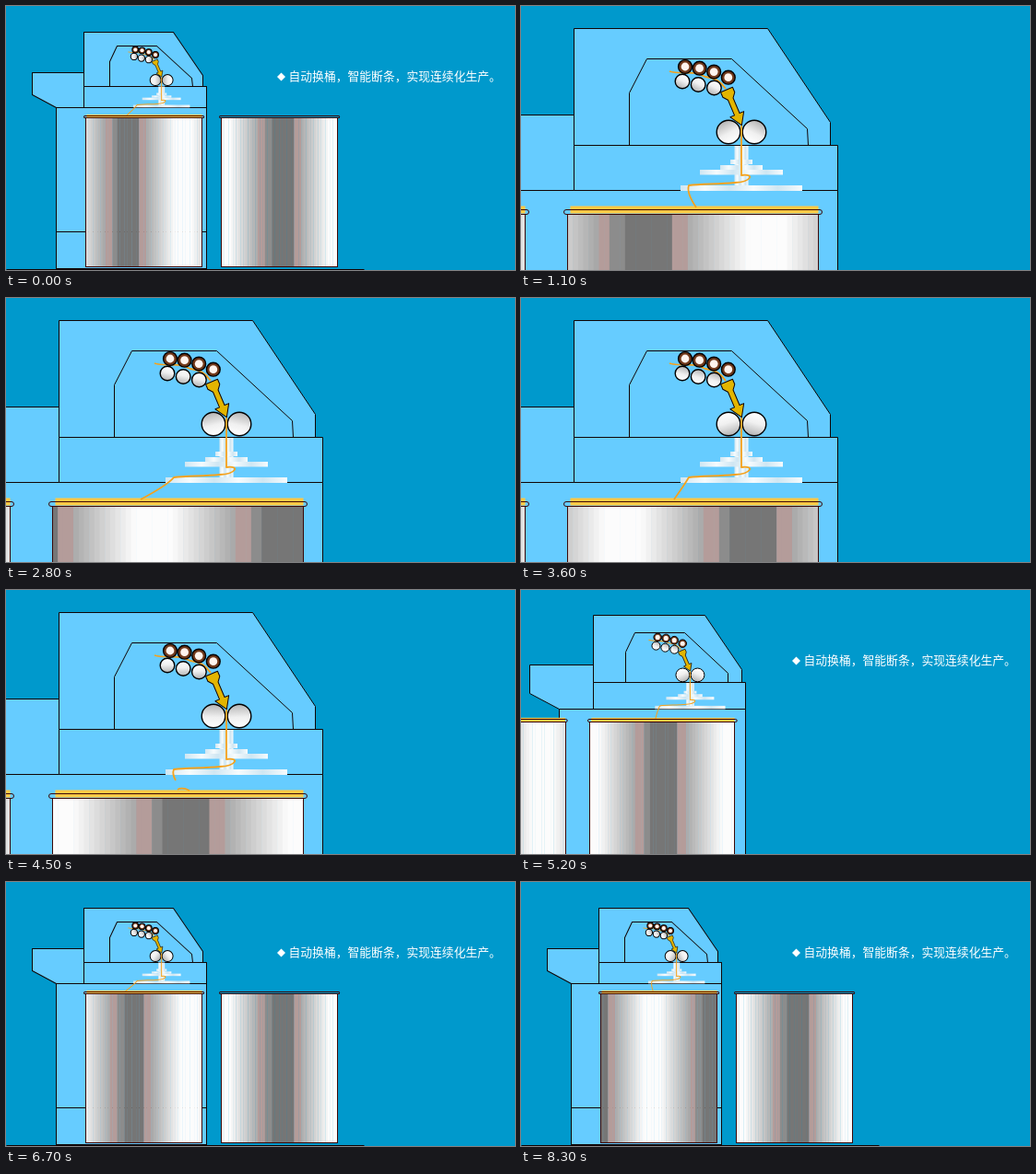
An HTML page with a canvas that plays this animation: 552 by 287 pixels, repeating every 8.4 s.

```html
<!DOCTYPE html>
<html lang="zh-CN">
<head>
<meta charset="utf-8">
<title>自动换桶</title>
<style>
html, body { margin: 0; width: 100%; height: 100%; overflow: hidden; background: #0099cc; }
canvas { display: block; }
</style>
</head>
<body>
<canvas id="stage" width="552" height="287"></canvas>
<script>
const ctx = document.getElementById('stage').getContext('2d');
const LOOP = 8400, STEP = 100, ZOOM = 2.15;
const SHIFT = { x: 123.6, y: 36.2 };
const CAN = { w: 272, top: 226, bottom: 574, strips: 48 };
const INK = '#100404', MAROON = '#3a0808', ORANGE = '#f5a21c', BLUE = '#66ccff';

// Scene units are the close-up's pixels; view maps them to the screen.
const view = { q: 1, x: 0, y: 0 };
let hair = 1;

const clamp = v => Math.max(0, Math.min(1, v));
const snapTo = (v, q, o) => (Math.floor(v * q + o) + .5 - o) / q;
const snapX = x => snapTo(x, view.q, view.x);
const snapY = y => snapTo(y, view.q, view.y);

function zoomAt(t) {
  return t < 4500 ? clamp(t / 900) : 1 - clamp((t - 4500) / 886);
}

// The can spins, rests while it is exchanged, then spins again.
function phaseAt(t) {
  const first = Math.min(Math.max(t - 200, 0), 4400);
  const second = Math.max(t - 6350, 0);
  return .32 - first * .00023 - second * .00028;
}

function shape(points, fill, close = true) {
  ctx.beginPath();
  points.forEach(([x, y]) => ctx.lineTo(snapX(x), snapY(y)));
  if (close) ctx.closePath();
  if (fill) { ctx.fillStyle = fill; ctx.fill(); }
  ctx.strokeStyle = INK;
  ctx.lineWidth = hair;
  ctx.stroke();
}

function box(x0, y0, x1, y1) {
  shape([[x0, y0], [x1, y0], [x1, y1], [x0, y1]], BLUE);
}

function disc(x, y, r, fill) {
  ctx.beginPath();
  ctx.arc(x, y, r, 0, Math.PI * 2);
  ctx.fillStyle = fill;
  ctx.fill();
}

function rimmed(x, y, r, fill) {
  disc(x, y, r, fill);
  ctx.strokeStyle = '#000';
  ctx.lineWidth = Math.max(1.4, hair);
  ctx.stroke();
}

function roller(x, y, r, turn) {
  const dx = Math.cos(turn) * r, dy = Math.sin(turn) * r;
  const g = ctx.createLinearGradient(x - dx, y - dy, x + dx, y + dy);
  g.addColorStop(0, '#ffffff');
  g.addColorStop(.45, '#f0f0f0');
  g.addColorStop(1, '#b4b4b4');
  rimmed(x, y, r, g);
}

function machine() {
  box(-7, 200.5, 343.5, 577);
  shape([[-7, 491], [343.5, 491]], null, false);
  shape([[-63, 118.7], [57.5, 118.7], [57.5, 200.5], [-7, 200.5], [-63, 172]], BLUE);
  shape([[57.5, 24.5], [267, 24.5], [335.5, 126], [335.5, 151.5], [57.5, 151.5]], BLUE);
  box(57.5, 151.5, 343.5, 200.5);
  shape([[117.5, 151], [117.5, 94], [136, 57.5], [228.5, 57.5], [310, 133], [311, 151]], null, false);
  shape([[-SHIFT.x, 579], [712, 579]], null, false);
}

function plate(half, y, h) {
  const g = ctx.createLinearGradient(239 - half, 0, 239 + half, 0);
  for (let i = 0; i < 6; i++) g.addColorStop(i / 5, i % 2 ? '#f6fbfd' : '#cfe6f2');
  ctx.fillStyle = g;
  ctx.fillRect(239 - half, y, half * 2, h);
}

function coiler() {
  plate(7.5, 152, 44);
  plate(12, 167, 5);
  plate(23, 173, 5);
  plate(45, 178, 5.5);
  plate(66, 195, 6);
}

function funnel() {
  const side = [[7, 0], [7, 6], [3, 11], [3, 29], [8, 29]];
  const mirror = side.map(([x, y]) => [-x, y]).reverse();
  ctx.save();
  ctx.translate(223, 91);
  ctx.rotate(-.4);
  ctx.beginPath();
  [...side, [0, 42], ...mirror].forEach(([x, y]) => ctx.lineTo(x, y));
  ctx.closePath();
  ctx.fillStyle = '#e3b500';
  ctx.fill();
  ctx.strokeStyle = INK;
  ctx.lineWidth = Math.min(hair, 1.2);
  ctx.stroke();
  ctx.restore();
}

function rollers(t) {
  const turn = t / 260;
  ctx.strokeStyle = ORANGE;
  ctx.lineWidth = Math.max(1.8, hair);
  ctx.beginPath();
  ctx.moveTo(161, 71);
  ctx.bezierCurveTo(176, 75, 184, 69, 200, 77);
  ctx.quadraticCurveTo(214, 78, 222, 90);
  ctx.stroke();
  for (let i = 0; i < 3; i++) roller(175 + 17.2 * i, 82 + 3.5 * i, 7.8, -turn);
  for (let i = 0; i < 4; i++) {
    const x = 178 + 15.6 * i, y = 66 + .6 * i + 1.1 * i * i;
    rimmed(x, y, 7.4, '#71391b');
    disc(x, y, 4.4, '#fff4ee');
  }
  funnel();
  roller(225, 137, 12.8, turn);
  roller(253, 137, 12.8, Math.PI - turn);
}

// Metal colour at signed distance d (in turns) from the darkest line.
function sheen(d) {
  const far = Math.abs(d);
  if (far > .12 && far < .178) return '#b49c9a';
  let grey = d < -.065 ? 140 : 118;
  if (far >= .178) grey = 168 + 84 * clamp((far - .178) / .25);
  return `rgb(${grey}, ${grey}, ${grey})`;
}

function can(x, phase, filled) {
  const { w, top, bottom, strips } = CAN;
  const left = snapX(x), right = snapX(x + w), roof = snapY(top);
  const step = (right - left) / strips;
  for (let i = 0; i < strips; i++) {
    const u = (i + .5) / strips - phase - .18;
    ctx.fillStyle = sheen(u - Math.round(u));
    const extra = i < strips - 1 ? .6 : 0;
    ctx.fillRect(left + i * step, roof, step + extra, bottom - roof);
  }
  ctx.strokeStyle = MAROON;
  ctx.lineWidth = hair;
  ctx.strokeRect(left, roof, right - left, snapY(bottom) - roof);
  if (filled) {
    ctx.fillStyle = '#ffc944';
    ctx.fillRect(x + 3, 217.5, w - 3, 8);
  }
  const lip = snapY(221);
  ctx.beginPath();
  ctx.roundRect(snapX(x - 4), lip, w + 8, roof - lip, 2.5);
  ctx.stroke();
}

function thread(t) {
  const tip = 168 + 22 * Math.cos((t - 1100) / 3400 * Math.PI * 2);
  const cut = t >= 4300 && t < 4700;
  ctx.strokeStyle = ORANGE;
  ctx.lineWidth = Math.max(1.8, hair);
  ctx.lineJoin = 'round';
  ctx.beginPath();
  ctx.moveTo(239, 130);
  ctx.lineTo(239, 184);
  ctx.bezierCurveTo(254, 182, 250, 191, 232, 192);
  ctx.bezierCurveTo(214, 194, 196, 193, 182, 195);
  if (cut) {
    ctx.quadraticCurveTo(180, 200, 184, 207);
    ctx.moveTo(186, 217);
    ctx.quadraticCurveTo(191, 214, 199, 218);
  } else {
    ctx.quadraticCurveTo(164 + tip * .08, 203, tip, 219);
  }
  ctx.stroke();
}

function caption() {
  ctx.fillStyle = '#fff';
  ctx.beginPath();
  [[298.5, 72.5], [303, 77], [298.5, 81.5], [294, 77]].forEach(([x, y]) => ctx.lineTo(x, y));
  ctx.fill();
  ctx.font = '12.8px "Noto Sans CJK SC", "Noto Sans CJK", sans-serif';
  ctx.fillText('自动换桶，智能断条，实现连续化生产。', 306.5, 81);
}

function draw(t) {
  const k = zoomAt(t);
  const q = (1 + (ZOOM - 1) * k) / ZOOM;
  ctx.setTransform(1, 0, 0, 1, 0, 0);
  ctx.fillStyle = '#0099cc';
  ctx.fillRect(0, 0, 552, 287);
  if (t < 100 || t >= 4600) caption();

  Object.assign(view, { q, x: SHIFT.x * (q - k), y: SHIFT.y * (q - k) });
  hair = 1 / q;
  ctx.setTransform(q, 0, 0, q, view.x, view.y);
  machine();
  coiler();
  rollers(t);
  if (t < 5500) {
    // The full can leaves to the left while the empty one takes its place.
    const slide = clamp(t / 550);
    can(61.5 - 329 * slide, .16, true);
    can(377.5 - 327 * slide, phaseAt(t), slide === 1);
  } else {
    can(61.5, phaseAt(t), true);
    can(377.5, .32, false);
  }
  thread(t);
}

function tick(now) {
  const t = now % LOOP;
  draw(Math.floor(t / STEP) * STEP);
  requestAnimationFrame(tick);
}

draw(0);
requestAnimationFrame(tick);
</script>
</body>
</html>
```
